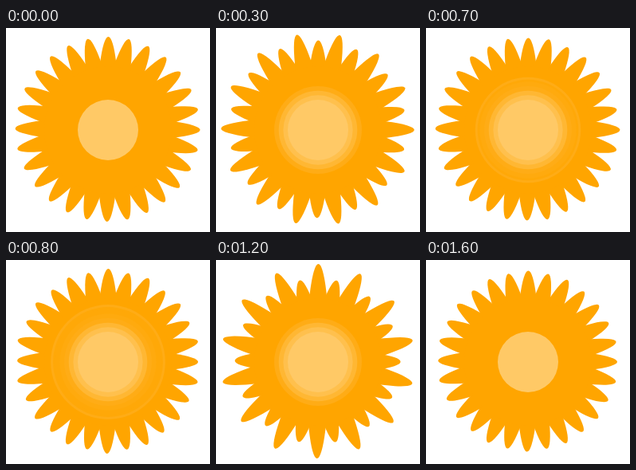
Animation, 256 px wide and 256 px high, one loop 1700 ms. Source, as an HTML page with a canvas:

```html
<!DOCTYPE html>
<html lang="en">
<head>
<meta charset="utf-8">
<title>Pulsing sun</title>
<style>
  html, body { margin: 0; width: 100%; height: 100%; overflow: hidden; background: #fff; }
  canvas { display: block; width: 256px; height: 256px; }
</style>
</head>
<body>
<canvas id="stage" width="256" height="256"></canvas>
<script>
const ctx = document.getElementById('stage').getContext('2d');
const LOOP = 1700, STEP = 100;
const RAYS = 28, RAY_HALF_WIDTH = 14.6, TILT = 0.4 * Math.PI / 180;
const CORE = 38, RING_GAP = 5.65;

// Keyframes: [time, length of even rays, length of odd rays]
const LENGTHS = [[0, 116, 116], [400, 110, 123], [1200, 122, 104], [1700, 111.5, 114.5]];
const GLOW = ['#ffc966', '#ffc04d', '#ffb733', '#ffac16', '#ffaa0e', '#ffa808'];

function rayLength(time, odd) {
  const i = LENGTHS.findIndex(key => key[0] > time);
  const a = LENGTHS[i - 1], b = LENGTHS[i];
  const part = (time - a[0]) / (b[0] - a[0]);
  return a[1 + odd] + (b[1 + odd] - a[1 + odd]) * part;
}

function disc(radius, color) {
  ctx.fillStyle = color;
  ctx.beginPath();
  ctx.arc(128, 128, radius, 0, Math.PI * 2);
  ctx.fill();
}

function drawRays(time) {
  ctx.fillStyle = '#ffa500';
  // Each ellipse spans two opposite rays.
  for (let i = 0; i < RAYS / 2; i++) {
    const angle = i * 2 * Math.PI / RAYS - Math.PI / 2 + TILT;
    ctx.beginPath();
    ctx.ellipse(127.6, 127, rayLength(time, i % 2), RAY_HALF_WIDTH, angle, 0, Math.PI * 2);
    ctx.fill();
  }
  disc(80, '#ffa500');
}

// The glow grows, rests, swells once more and then retraces its steps.
function ringCount(step) {
  const rise = Math.min(step, 16 - step);
  return rise <= 5 ? Math.min(rise, 3) : rise - 2;
}

function drawGlow(step) {
  const rings = ringCount(step);
  const swelling = rings > 3;
  if (swelling) {
    const edge = CORE + rings * RING_GAP;
    disc(edge, GLOW[3]);
    disc(edge - 3, GLOW[5]);
  }
  for (let i = swelling ? rings - 1 : rings; i >= 0; i--) {
    disc(CORE + i * RING_GAP, GLOW[i]);
  }
}

function draw(now) {
  const step = Math.floor((now % LOOP) / STEP);
  ctx.fillStyle = '#fff';
  ctx.fillRect(0, 0, 256, 256);
  drawRays(step * STEP);
  drawGlow(step);
}

const start = performance.now();
function tick() {
  draw(performance.now() - start);
  requestAnimationFrame(tick);
}
tick();
</script>
</body>
</html>
```
